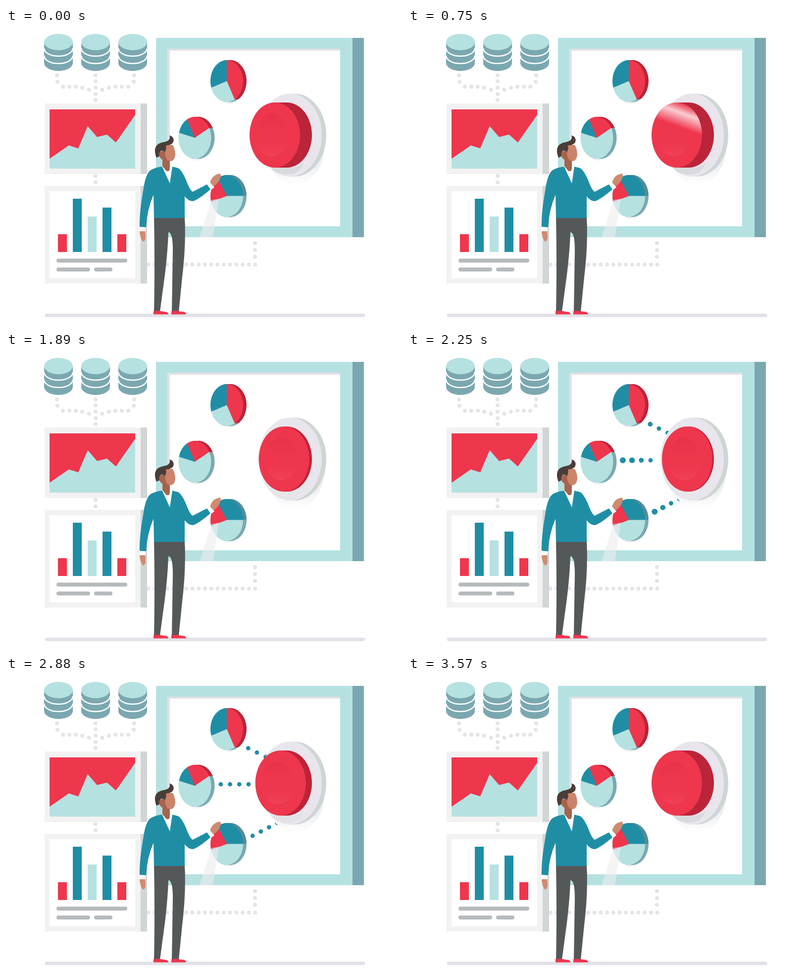
Animation of 800 by 600 pixels, one loop 3.6 s. Source, as an HTML page:

```html
<!DOCTYPE html>
<html lang="en">
<head>
<meta charset="utf-8">
<title>Dashboard button</title>
<style>
  html, body { margin: 0; width: 100%; height: 100%; overflow: hidden; background: #fff; }
  svg { display: block; width: 800px; height: 600px; }
</style>
</head>
<body>
<svg viewBox="0 0 800 600">
  <defs>
    <linearGradient id="glow" x2="0" y2="1">
      <stop stop-color="#fff" stop-opacity="0"/>
      <stop offset=".4" stop-color="#fff" stop-opacity=".75"/>
      <stop offset="1" stop-color="#fff" stop-opacity="0"/>
    </linearGradient>
    <linearGradient id="dish" x2="0" y2="1">
      <stop stop-color="#d92c45" stop-opacity=".35"/>
      <stop offset=".5" stop-color="#ee364d" stop-opacity="0"/>
      <stop offset="1" stop-color="#f5566a" stop-opacity=".4"/>
    </linearGradient>
    <linearGradient id="fade" x2="0" y2="1">
      <stop offset=".75" stop-color="#eeeef2"/>
      <stop offset="1" stop-color="#fff"/>
    </linearGradient>
    <clipPath id="faceClip"><ellipse rx="51" ry="66"/></clipPath>
  </defs>

  <g id="trail" fill="#e5e5e8"></g>
  <g id="stores"></g>

  <!-- area chart -->
  <path fill="#f2f2f2" d="M78 153H272V296H78Z"/>
  <path fill="#d0d5d5" d="M272 153H285V296H272Z"/>
  <path fill="#ee364d" d="M88 165H261V285H88Z"/>
  <path fill="#b5e1e1" d="M88 265L127 238L146 244L165 199L184 221L204 216L222 232L261 176V285H88Z"/>

  <!-- bar chart -->
  <path fill="#f2f2f2" d="M78 320H272V518H78Z"/>
  <path fill="#d0d5d5" d="M272 320H285V518H272Z"/>
  <path fill="#fff" d="M88 331H261V507H88Z"/>
  <g id="bars"></g>
  <path stroke="#b5babd" stroke-width="8" stroke-linecap="round" d="M106 471.5H241M106 489.500H166M182 489.500H211"/>

  <!-- board -->
  <path fill="#b5e1e1" d="M303 20H700V424H303Z"/>
  <path fill="#7ba8b0" d="M700 20H723V424H700Z"/>
  <path fill="#e3e1e8" d="M326 42H675V402H326Z"/>
  <path fill="#fff" d="M331 46H675V402H331Z"/>
  <g id="pies"></g>
  <path fill="#ededee" fill-opacity=".6" d="M415 349L430 346L418 424H391Z"/>

  <g id="links" fill="#1f8ea5"></g>

  <!-- button -->
  <ellipse cx="584" cy="234" rx="60" ry="84" fill="url(#fade)"/>
  <ellipse cx="583" cy="217" rx="64" ry="84" fill="#ced6d5"/>
  <ellipse cx="574" cy="217" rx="64" ry="84" fill="#e8e6ec"/>
  <path id="shade" fill="#d9dadd"/>
  <path id="body" fill="#bb2439"/>
  <g id="face">
    <ellipse rx="51" ry="66" fill="#ee364d"/>
    <ellipse cx="-6" rx="34" ry="43" fill="url(#dish)"/>
    <g clip-path="url(#faceClip)">
      <rect id="shine" x="-110" y="-24" width="220" height="48" fill="url(#glow)"/>
    </g>
  </g>

  <path stroke="#e3e1e8" stroke-width="7" stroke-linecap="round" d="M82 582.500H722"/>

  <!-- presenter -->
  <path fill="#555859" d="M299 383H361Q364 440 356 505L349 575H335L337 450Q337 414 328 414Q327 450 321 500L311 575H299Q301 480 299 383Z"/>
  <path id="shoe" fill="#ee364d" d="M298 580.500V573.500H311Q317 575 324 575.500Q328 577 328 580.500Z"/>
  <use href="#shoe" x="36"/>
  <path fill="#cf8b71" d="M270 411H281L282 422Q282 432 277 433Q270 425 270 411ZM411 317Q415 302 423 298L431 295Q436 296 433 304Q430 314 418 322Z"/>
  <path fill="#fff" d="M270 403H283L281 412H270ZM404 319L412 313L421 323L413 329Z"/>
  <path fill="#1f8ea5" d="M318 281Q306 281 294 287Q284 292 279 318C274 350 270 370 270 403L283 404Q285 368 298 338L299 385H361V341Q368 351 378 351Q390 347 413 327L406 317L377 332Q372 329 366 314Q357 290 348 284L336 281Z"/>
  <path fill="#fff" d="M315 280L331 315L336 281L330 278Z"/>
  <path fill="#a7634c" d="M309 252Q322 244 329 254L331 268V283Q331 292 324 290L316 280V267Q308 262 309 252Z"/>
  <path fill="#cb8469" d="M323 237H337Q342 247 342 256Q341 270 331 270Q322 268 321 252Z"/>
  <path fill="#4a3d38" d="M304 263C299 251 300 240 308 235C316 230 327 232 330 225Q332 221 330 218C339 219 341 229 336 234Q331 238 323 238Q325 244 321 252Q319 247 313 249Q308 252 310 260Z"/>
</svg>

<script>
const LOOP = 3600;
const RED = '#ee364d', TEAL = '#1f8ea5', PALE = '#b5e1e1', SLATE = '#7ba8b0';
const SIDE = { [RED]: '#bb2439', [TEAL]: '#588c98', [PALE]: SLATE };
const $ = id => document.getElementById(id);

function add(parent, tag, attrs) {
  const el = document.createElementNS('http://www.w3.org/2000/svg', tag);
  for (const key in attrs) el.setAttribute(key, attrs[key]);
  return $(parent).appendChild(el);
}
const dot = (parent, cx, cy, r = 4) => add(parent, 'circle', { cx, cy, r });

// Grey dotted trails
for (const [dx, y] of [[78, 96], [77, 109], [66, 119], [53, 119], [40, 119], [27, 121], [13.5, 125]]) {
  dot('trail', 181 - dx, y);
  dot('trail', 181 + dx, y);
}
for (const y of [96, 108, 121, 134, 146, 300, 313]) dot('trail', 181, y);
for (const y of [436, 450, 464]) dot('trail', 503, y);
for (let k = 0; k < 18; k++) dot('trail', 503.5 - 12.7 * k, 479.5);

// Data stores
for (const x of [106, 181, 256]) {
  const arc = y => `M${x - 29} ${y}A29 16 0 0 0 ${x + 29} ${y}`;
  add('stores', 'path', { d: `${arc(71)}V28H${x - 29}Z`, fill: SLATE });
  for (const y of [41, 56]) add('stores', 'path', { d: arc(y), fill: 'none', stroke: '#fff', 'stroke-width': 2.5 });
  add('stores', 'ellipse', { cx: x, cy: 28.5, rx: 29, ry: 16.5, fill: PALE });
}

[[RED, 36], [TEAL, 108], [PALE, 72], [TEAL, 90], [RED, 36]].forEach(([fill, height], i) =>
  add('bars', 'rect', { x: 105 + 30 * i, y: 454 - height, width: 18, height, fill }));

// Pies: each slice is [colour, start, end] in degrees clockwise from the right
function sector(cx, cy, from, to) {
  const at = deg => {
    const a = deg * Math.PI / 180;
    return `${cx + 33 * Math.cos(a)} ${cy + 42.5 * Math.sin(a)}`;
  };
  return `M${cx} ${cy}L${at(from)}A33 42.5 0 ${+(to - from > 180)} 1 ${at(to)}Z`;
}
function pie(cx, cy, slices) {
  add('pies', 'ellipse', { cx: cx + 5, cy: cy + 4, rx: 33, ry: 42, fill: '#f0f0f3' });
  for (let depth = 7; depth >= 0; depth--)
    for (const [color, from, to] of slices)
      add('pies', 'path', { d: sector(cx + depth, cy, from, to), fill: depth ? SIDE[color] : color });
}
pie(446, 107.5, [[RED, -90, 61], [PALE, 61, 162], [TEAL, 162, 270]]);
pie(381.5, 222.5, [[RED, -119, -28], [PALE, -28, 194], [TEAL, 194, 241]]);
pie(446, 340.5, [[TEAL, -124, 0], [PALE, 0, 164], [RED, 164, 236]]);

// Link dots, listed from the button outwards: x, y, step, count, lead time
const links = [];
for (const [x, y, dx, dy, count, lead] of [
  [524.5, 164, -17.6, -8.8, 3, 50],
  [490, 219.5, -18.7, 0, 4, 0],
  [548, 298, -16.6, 8.6, 4, 30]
]) for (let k = 0; k < count; k++)
  links.push({ el: dot('links', x + dx * k, y + dy * k, 0), on: 2000 + 50 * k - lead, off: 3000 + 40 * k });

const span = (t, from, to) => Math.min(1, Math.max(0, (t - from) / (to - from)));
const smooth = p => (1 - Math.cos(Math.PI * p)) / 2;
const pop = p => 1 + 5 * (p - 1) ** 3 + 4 * (p - 1) ** 2;

function draw(t) {
  const pressed = smooth(span(t, 1680, 1950)) - smooth(span(t, 2700, 3090));
  const x = 543 + 21 * pressed;
  $('face').setAttribute('transform', `translate(${x} 217)`);
  $('body').setAttribute('d', `M${x} 151H567A51 66 0 0 1 567 283H${x}Z`);
  $('shade').setAttribute('d', `M${x - 8} 283H575Q592 283 602 272Q594 296 572 297Q548 299 534 283Z`);
  $('shade').setAttribute('opacity', 1 - pressed);

  $('shine').setAttribute('transform', `rotate(20) translate(0 ${-90 + 180 * span(t, 630, 1070)})`);

  for (const { el, on, off } of links)
    el.setAttribute('r', Math.max(0, 4.4 * pop(span(t, on, on + 250)) * (1 - span(t, off, off + 200))));
}

function tick() {
  draw(performance.now() % LOOP);
  requestAnimationFrame(tick);
}
tick();
</script>
</body>
</html>
```
